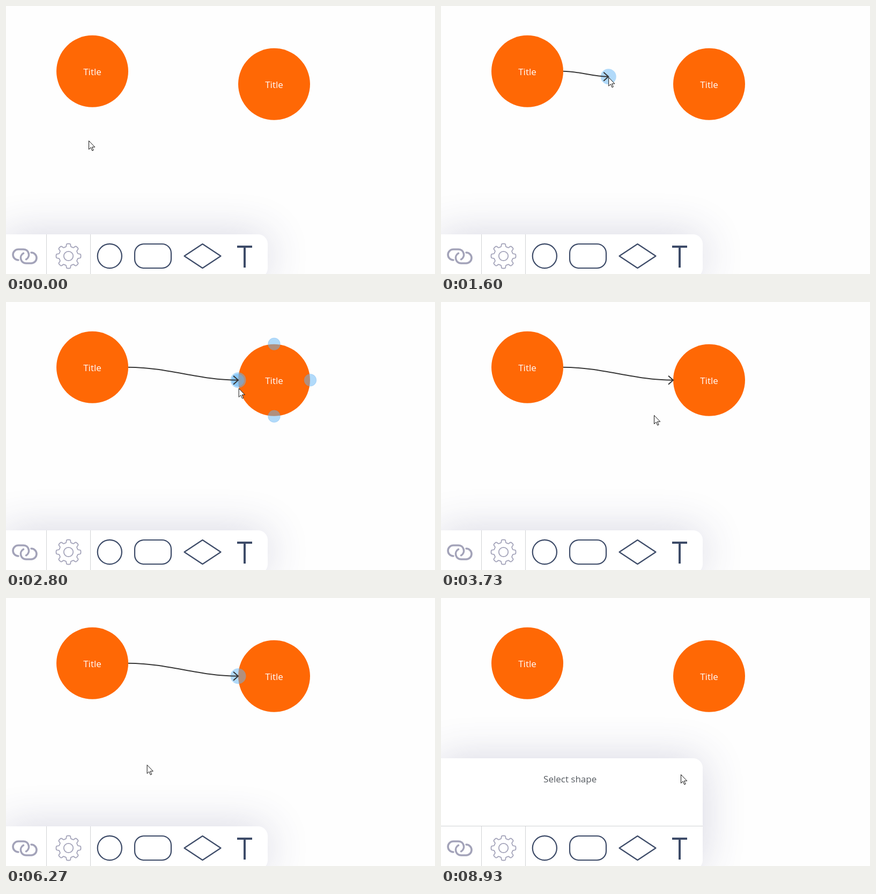
An HTML page that plays this animation: 800 by 500 pixels, repeating every 9340 ms.

```html
<!DOCTYPE html>
<html lang="en">
<head>
<meta charset="utf-8">
<title>Connecting shapes</title>
<style>
html, body { margin: 0; width: 100%; height: 100%; overflow: hidden; background: #fefefe; }
#stage { position: relative; width: 100%; height: 100%; overflow: clip; contain: strict; }
#panel {
  position: absolute; left: -7px; right: calc(100% - 488px); bottom: -7px;
  background: #fff; border-radius: 0 18px 18px 0;
  box-shadow: 0 0 80px rgba(50, 50, 110, .2);
}
svg { position: absolute; inset: 0; display: block; overflow: hidden; }
text { font: 17px "Open Sans", "Noto Sans", sans-serif; text-anchor: middle; }
.node circle { fill: #ff6805; }
.node text { fill: #fff; }
.handle { fill: rgba(100, 181, 246, .5); }
.port { stroke: rgba(100, 170, 235, .3); }
.icon { fill: none; stroke: #3d4b68; stroke-width: 2.2; }
.pale { fill: none; stroke: #a3a3b9; stroke-width: 1.8; stroke-linejoin: round; }
.rule { fill: none; stroke: #d0d2d4; }
#line { fill: none; stroke: #383838; stroke-width: 2; }
</style>
</head>
<body>
<div id="stage">
<div id="panel"></div>
<svg width="800" height="500">
  <path class="rule" d="M75.5 426V500M157.5 426V500"/>
  <g class="pale" style="stroke-width:3.6" stroke-linecap="round">
    <path id="link" d="M23 474a10 10 0 0 1 0-20h9.5a10 10 0 0 1 5 18.7"/>
    <use href="#link" transform="rotate(180 35 467)"/>
  </g>
  <g class="pale" transform="translate(116.5 466.5)">
    <path id="gear"/>
    <circle r="8.7"/>
  </g>
  <g class="icon">
    <circle cx="193.3" cy="466.5" r="22.6"/>
    <rect x="240" y="444" width="68" height="45" rx="17"/>
    <path d="M332.5 466.5l34-22.5l34 22.5l-34 22.5Z" stroke-linejoin="round"/>
    <path d="M431 449h28M445 449v39" stroke-width="4"/>
  </g>

  <path id="divider" class="rule" d="M0 425.5H488"/>
  <g id="editor">
    <rect class="rule" x="11.5" y="367.5" width="459" height="40" rx="8" style="fill:#fafafa"/>
    <g class="icon" style="stroke-width:1.8;fill:#fff" stroke-linecap="round">
      <rect x="447.5" y="322" width="18" height="23" rx="3"/>
      <rect x="452.5" y="317" width="8" height="6" rx="2"/>
      <rect x="445.7" y="320" width="21.6" height="5" rx="2.5"/>
      <path d="M452 331.5v9m4.5-9v9m4.5-9v9"/>
    </g>
  </g>
  <text id="hint" x="240.7" y="344" fill="#555a60">Select shape</text>

  <g id="nodes"></g>
  <circle id="grip" class="handle" r="14.5"/>
  <path id="line"/>
  <path id="cursor" d="M.5.5v16l3.7-3.5l2.6 6l2.3-1l-2.6-5.8h5.2Z" fill="#fff" stroke="#111"/>
</svg>
</div>
<script>
const LOOP = 9340, RADIUS = 67;
const A = { x: 161, y: 121.8 }, B = { x: 500, y: 145.8 };
const HOME = [154, 251];

// Moments at which the state switches, in ms
const HOVER = 760, DRAG = 1130, ENTER = 2000, DROP = 2670, LEAVE = 2870,
      SELECT = 5130, OPEN = 6670, REMOVE = 7800;

// Cursor moves: start, end, destination
const moves = [
  [600, 870, 219, 125],
  [DRAG, 2200, 446, 144],
  [DROP, 3070, 397, 211],
  [3730, 5330, 411, 145],
  [6000, 6530, 124, 466],
  [OPEN, 7000, 332, 349],
  [7000, 7530, 447, 329]
];

const $ = id => document.getElementById(id);
const show = (id, on) => $(id).style.display = on ? '' : 'none';
const smooth = k => k * k * (3 - 2 * k);
const clamp = k => Math.min(1, Math.max(0, k));

function cursorAt(t) {
  let [x, y] = HOME;
  for (const [from, to, tx, ty] of moves) {
    const k = smooth(clamp((t - from) / (to - from)));
    x += (tx - x) * k;
    y += (ty - y) * k;
  }
  return [x, y];
}

function node({ x, y }, portsId) {
  const ports = [0, 1, 2, 3].map(i => {
    const angle = i * Math.PI / 2, r = RADIUS + .5;
    return `<circle class="handle port" cx="${x + r * Math.cos(angle)}" cy="${y + r * Math.sin(angle)}" r="11.3"/>`;
  });
  return `<g class="node"><circle cx="${x}" cy="${y}" r="${RADIUS}"/>
    <text x="${x}" y="${y + 6.7}">Title</text></g><g id="${portsId}">${ports.join('')}</g>`;
}

function gearPath() {
  const steps = 240;
  const points = Array.from({ length: steps }, (_, i) => {
    const a = i / steps * 2 * Math.PI;
    const r = 20.4 + 2.6 * Math.tanh(3 * Math.cos(8 * a));
    return `${r * Math.sin(a)} ${-r * Math.cos(a)}`;
  });
  return `M${points.join('L')}Z`;
}

function linkPath(ex, ey) {
  const sx = A.x + RADIUS, bend = (ex - sx) * .36;
  return `M${sx} ${A.y}C${sx + bend} ${A.y} ${ex - bend} ${ey} ${ex} ${ey}m-9-8l9 8l-9 8`;
}

function draw(t) {
  const [x, y] = cursorAt(t);
  const open = t >= OPEN;
  const [ex, ey] = t < DROP ? [x, y - 1] : [B.x - RADIUS, B.y];

  $('cursor').setAttribute('transform', `translate(${x} ${y})`);
  $('line').setAttribute('d', linkPath(ex, ey));
  $('grip').setAttribute('cx', ex);
  $('grip').setAttribute('cy', ey);
  $('panel').style.top = open ? '299px' : '426px';

  show('portsA', t >= HOVER && t < DRAG);
  show('portsB', t >= ENTER && t < LEAVE);
  show('line', t >= DRAG && t < REMOVE);
  show('grip', t >= DRAG && t < LEAVE || t >= SELECT && t < REMOVE);
  show('divider', open);
  show('editor', open && t < REMOVE);
  show('hint', t >= REMOVE);
}

$('nodes').innerHTML = node(A, 'portsA') + node(B, 'portsB');
$('gear').setAttribute('d', gearPath());
const start = performance.now();
(function frame() {
  draw((performance.now() - start) % LOOP);
  requestAnimationFrame(frame);
})();
</script>
</body>
</html>
```
